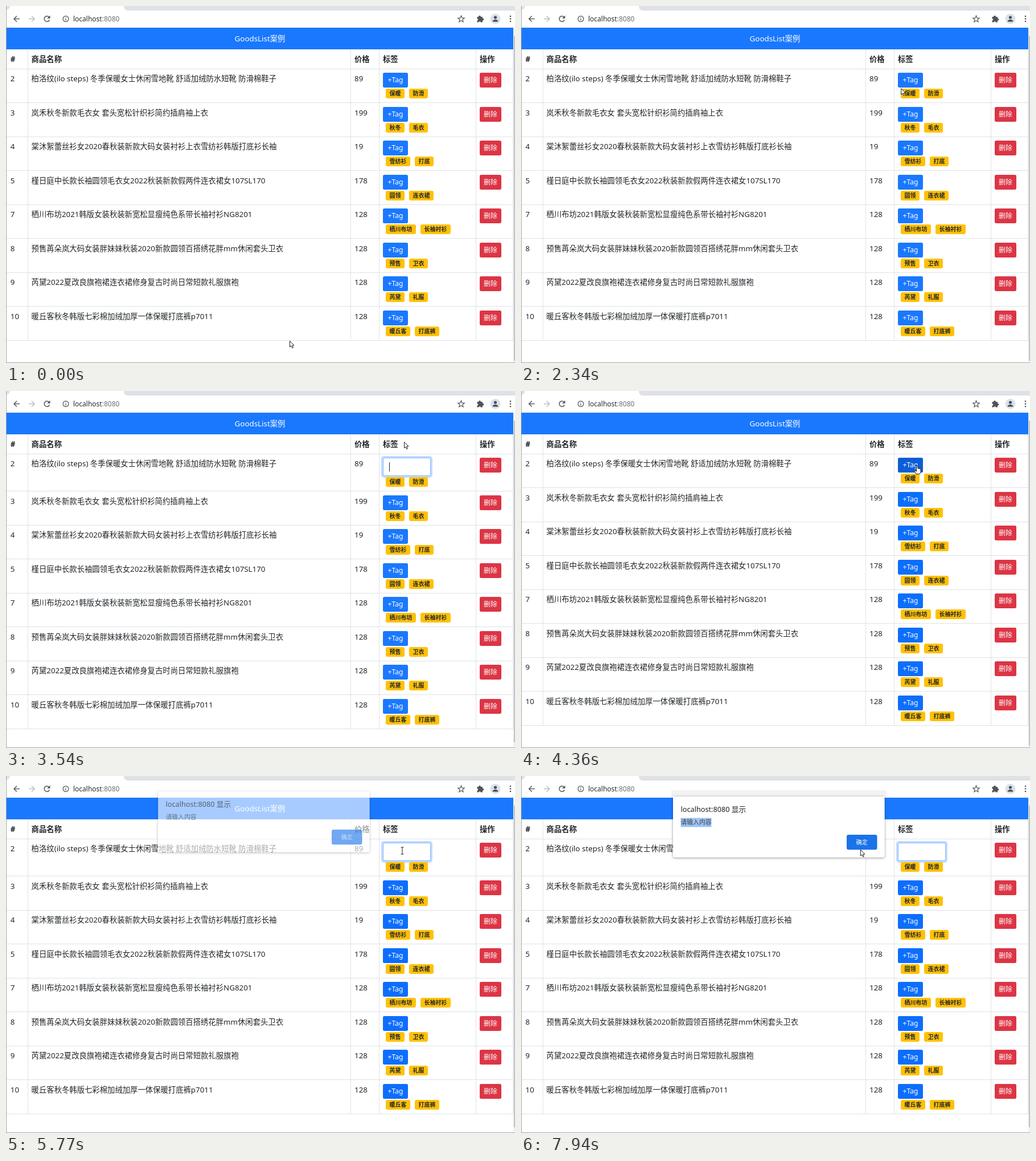
Animation, 894 px wide and 626 px high, one loop 8000 ms. Source, as an HTML page with a canvas:

```html
<!DOCTYPE html>
<html lang="zh-CN">
<head>
<meta charset="utf-8">
<title>GoodsList案例</title>
<style>
html, body { margin: 0; width: 100%; height: 100%; overflow: hidden; background: #fff; }
canvas { display: block; }
</style>
</head>
<body>
<canvas id="stage" width="894" height="626"></canvas>
<script>
const ctx = document.getElementById('stage').getContext('2d');
const LOOP = 8000;
const FONT = '"Noto Sans", "Noto Sans CJK SC", "Noto Sans CJK", sans-serif';
const INK = '#212529', ICON = '#50545a', LINE = '#dee2e6';

const goods = [
  ['2', '柏洛纹(ilo steps) 冬季保暖女士休闲雪地靴 舒适加绒防水短靴 防滑棉鞋子', '89', ['保暖', '防滑']],
  ['3', '岚禾秋冬新款毛衣女 套头宽松针织衫简约插肩袖上衣', '199', ['秋冬', '毛衣']],
  ['4', '棠沐絮蕾丝衫女2020春秋装新款大码女装衬衫上衣雪纺衫韩版打底衫长袖', '19', ['雪纺衫', '打底']],
  ['5', '槿日庭中长款长袖圆领毛衣女2022秋装新款假两件连衣裙女107SL170', '178', ['圆领', '连衣裙']],
  ['7', '栖川布坊2021韩版女装秋装新宽松显瘦纯色系带长袖衬衫NG8201', '128', ['栖川布坊', '长袖衬衫']],
  ['8', '预售苒朵岚大码女装胖妹妹秋装2020新款圆领百搭绣花胖mm休闲套头卫衣', '128', ['预售', '卫衣']],
  ['9', '芮黛2022夏改良旗袍裙连衣裙修身复古时尚日常短款礼服旗袍', '128', ['芮黛', '礼服']],
  ['10', '暖丘客秋冬韩版七彩棉加绒加厚一体保暖打底裤p7011', '128', ['暖丘客', '打底裤']]
];

// Pointer moves: start, end, steps, target x, target y
const moves = [
  [130, 1090, 8, 610, 191],
  [1650, 1651, 1, 608, 189],
  [1810, 2354, 5, 682, 133],
  [2760, 3300, 5, 699, 89],
  [4000, 4360, 4, 696, 131],
  [6260, 6900, 6, 340, 81],
  [7030, 7290, 3, 287, 81],
  [7410, 7411, 1, 280, 81],
  [7530, 7940, 4, 596, 129]
];

const between = (t, a, b) => t >= a && t < b;
const inside = (p, x, y, w, h) => between(p.x, x, x + w) && between(p.y, y, y + h);

function rect(x, y, w, h, color) {
  ctx.fillStyle = color;
  ctx.fillRect(x, y, w, h);
}

function box(x, y, w, h, r, fill, stroke) {
  ctx.beginPath();
  ctx.roundRect(x, y, w, h, r);
  ctx.fillStyle = fill;
  ctx.fill();
  if (!stroke) return;
  ctx.strokeStyle = stroke;
  ctx.lineWidth = 1;
  ctx.stroke();
}

function disc(x, y, r, color) {
  ctx.beginPath();
  ctx.arc(x, y, r, 0, Math.PI * 2);
  ctx.fillStyle = color;
  ctx.fill();
}

function line(points, color, width) {
  ctx.beginPath();
  for (const [x, y] of points) ctx.lineTo(x, y);
  ctx.strokeStyle = color;
  ctx.lineWidth = width;
  ctx.stroke();
}

function text(str, x, y, size = 13.35, color = INK, weight = 400, align = 'left') {
  ctx.font = `${weight} ${size}px ${FONT}`;
  ctx.textAlign = align;
  ctx.fillStyle = color;
  ctx.fillText(str, x, Math.round(y));
}

function pointer(t) {
  let x = 498, y = 587;
  for (const [start, end, steps, tx, ty] of moves) {
    if (t < start) break;
    const step = Math.floor((t - start) / (end - start) * (steps - 1) + 1e-6) + 1;
    const k = Math.min(1, step / steps);
    x += (tx - x) * k;
    y += (ty - y) * k;
  }
  return { x, y };
}

function toolbar() {
  ctx.fillStyle = '#dee1e6';
  ctx.beginPath();
  ctx.moveTo(207, 0);
  ctx.quadraticCurveTo(207, 8, 215, 8);
  ctx.lineTo(894, 8);
  ctx.lineTo(894, 0);
  ctx.fill();
  ctx.beginPath();
  ctx.moveTo(0, 0);
  ctx.lineTo(7, 0);
  ctx.quadraticCurveTo(6, 6, 0, 7);
  ctx.fill();

  for (const [x, dir, color] of [[19, -1, ICON], [45, 1, '#b9bbbe']]) {
    line([[x - dir * 5, 22.5], [x + dir * 5, 22.5]], color, 1.4);
    line([[x, 17.5], [x + dir * 5, 22.5], [x, 27.5]], color, 1.4);
  }
  ctx.beginPath();
  ctx.arc(72, 22.5, 4.8, 0.4, 5.5);
  ctx.strokeStyle = ICON;
  ctx.lineWidth = 1.5;
  ctx.stroke();
  ctx.fillStyle = ICON;
  ctx.beginPath();
  ctx.moveTo(77.5, 16.5);
  ctx.lineTo(77.5, 21.8);
  ctx.lineTo(72.2, 21.8);
  ctx.fill();

  ctx.beginPath();
  ctx.arc(105, 22.5, 4.9, 0, Math.PI * 2);
  ctx.lineWidth = 1.2;
  ctx.stroke();
  rect(104.4, 22, 1.2, 3.3, ICON);
  rect(104.4, 19.6, 1.2, 1.3, ICON);
  text('localhost', 118, 27, 12, '#26282b');
  text(':8080', 118 + ctx.measureText('localhost').width, 27, 12, '#6a6e73');

  ctx.beginPath();
  for (let i = 0; i < 10; i++) {
    const a = i * Math.PI / 5 - Math.PI / 2, r = i % 2 ? 2.6 : 6;
    ctx.lineTo(799.5 + r * Math.cos(a), 23 + r * Math.sin(a));
  }
  ctx.closePath();
  ctx.strokeStyle = ICON;
  ctx.lineWidth = 1.2;
  ctx.stroke();

  rect(827.5, 19, 9.5, 9.5, ICON);
  disc(832, 18.6, 1.9, ICON);
  disc(837.4, 23.6, 1.9, ICON);
  disc(827.6, 23.8, 1.6, '#fff');
  disc(832, 28.6, 1.6, '#fff');

  disc(859.5, 22.5, 9, '#dbe1e9');
  disc(859.5, 20, 2.6, '#454e5c');
  ctx.beginPath();
  ctx.ellipse(859.5, 27.5, 5, 3.7, 0, Math.PI, 0);
  ctx.fill();
  for (const y of [18, 22.5, 27]) disc(886, y, 1.35, ICON);
}

function badges(tags, y) {
  let x = 667;
  for (const tag of tags) {
    const w = tag.length * 10 + 13;
    box(x, y, w, 17, 3.3, '#ffc107');
    text(tag, x + w / 2, y + 12.3, 10, INK, 700, 'center');
    x += w + 8;
  }
}

function button(label, x, y, w, color, size) {
  box(x, y, w, 26, 2.7, color);
  text(label, x + w / 2, y + 17.3, size, '#fff', 400, 'center');
}

function input(focused, caret) {
  if (focused) box(659, 114, 90, 38, 5, '#c2dbfe');
  box(662.5, 117.5, 83, 31, 3, '#fff', focused ? '#86b7fe' : '#ced4da');
  if (caret) rect(673, 125, 1, 16, '#222');
}

function table(t, editing, cursor) {
  const blue = t < 3690 ? '#1a78ff' : '#0d6efd';
  const grow = editing ? 6 : 0;
  const bottom = 586 + grow;
  rect(1, 38, 890, 38, '#1a78ff');
  text('GoodsList案例', 446, 62, 13.35, '#fff', 400, 'center');

  for (const x of [38, 605, 655, 825, 890]) rect(x, 76, 1, bottom - 75, LINE);
  rect(1, 110, 890, 1, LINE);
  const heads = [['#', 7.8], ['商品名称', 44.6], ['价格', 612], ['标签', 662], ['操作', 832]];
  for (const [label, x] of heads) text(label, x, 98.3, 13.35, INK, 700);

  goods.forEach(([id, name, price, tags], i) => {
    const y = 110 + 59.5 * i + (i ? grow : 0);
    const top = Math.round(y + 7.2);
    const edited = editing && i === 0;
    rect(1, Math.floor(110 + 59.5 * (i + 1) + grow), 890, 1, LINE);
    text(id, 7.8, y + 22);
    text(name, 44.6, y + 22);
    text(price, 612, y + 22);
    if (edited) {
      const focused = between(t, 2610, 3690) || t >= 4880;
      const caret = between(t, 2490, 3010) || between(t, 3530, 3690) || between(t, 4730, 5310);
      input(focused, caret);
    } else {
      const hover = inside(cursor, 662, top, 44, 26);
      button('+Tag', 662, top, 44, hover ? '#0b5ed7' : blue, 12.2);
    }
    badges(tags, Math.round(y + 35.2) + (edited ? 6 : 0));
    button('删除', 832, top, 38, '#dc3545', 11.9);
  });
}

function frame(editing) {
  rect(891, 39, 3, 587, '#f1f1f1');
  rect(892, 52, 2, editing ? 564 : 570, '#c1c1c1');
  rect(0, 0, 1, 626, '#a6a6a6');
  rect(0, 625, 894, 1, '#a6a6a6');
}

// The shadow is clipped to the outside so it never shows through the panel.
function panel(x, y, w, h, r) {
  ctx.save();
  ctx.beginPath();
  ctx.rect(0, 0, 894, 626);
  ctx.roundRect(x, y, w, h, r);
  ctx.clip('evenodd');
  ctx.shadowColor = 'rgba(0,0,0,.45)';
  ctx.shadowBlur = 4;
  ctx.shadowOffsetY = 1;
  box(x, y, w, h, r, '#fff');
  ctx.restore();
  box(x, y, w, h, r, '#fff');
}

function dialog(t, cursor) {
  ctx.save();
  if (t < 5890) {
    ctx.globalAlpha = 0.62;
    ctx.translate(0, -9);
  } else {
    rect(264, 25, 378, 11, '#f2f2f3');
  }
  panel(267, 36, 371.5, 106.5, 3);
  text('localhost:8080 显示', 280.5, 63, 12.7, '#202124');
  if (t >= 7030) {
    const from = t >= 7410 ? 0 : Math.min(5, Math.max(0, Math.round((cursor.x - 280.5) / 10.8)));
    rect(280.5 + from * 10.8, 73.5, (5 - from) * 10.8, 16, '#9cc3f5');
  }
  text('请输入内容', 280.5, 85.3, 10.8, '#3c4043');
  box(572, 103, 53.5, 26.3, 3.3, '#1a73e8');
  text('确定', 598.8, 120, 10.2, '#fff', 400, 'center');
  ctx.restore();
}

function shape(points) {
  ctx.beginPath();
  for (const [x, y] of points) ctx.lineTo(x, y);
  ctx.closePath();
  ctx.fillStyle = '#fff';
  ctx.fill();
  ctx.strokeStyle = '#222';
  ctx.lineWidth = 1;
  ctx.stroke();
}

const cursors = {
  arrow() {
    shape([[0.5, 0.5], [0.5, 11], [3, 8.8], [4.7, 12.7], [6.4, 12], [4.8, 8.2], [8, 8]]);
  },
  beam() {
    line([[0, -6], [0, 6]], '#333', 1.1);
    for (const y of [-6, 6]) line([[-2.5, y], [2.5, y]], '#333', 1.1);
  },
  hand() {
    shape([[-1.5, 0], [0.8, 0], [0.8, 4.5], [6, 5.8], [6, 10.5], [4.5, 14.5],
      [-1.8, 14.5], [-5, 9.5], [-4, 8.3], [-1.5, 10]]);
  }
};

function drawCursor(p, editing, modal) {
  let kind = 'arrow';
  if (modal && inside(p, 267, 36, 372, 107)) {
    if (inside(p, 278, 73, 64, 17)) kind = 'beam';
  } else if (editing && inside(p, 662, 117, 84, 32)) {
    kind = 'beam';
  } else if (!editing && inside(p, 662, 117, 44, 26)) {
    kind = 'hand';
  }
  ctx.save();
  ctx.translate(p.x, p.y);
  cursors[kind]();
  ctx.restore();
}

function draw(now) {
  const t = now % LOOP;
  const cursor = pointer(t);
  const editing = between(t, 2490, 3690) || t >= 4730;
  const modal = t >= 5770;
  rect(0, 0, 894, 626, '#fff');
  toolbar();
  table(t, editing, cursor);
  frame(editing);
  if (modal) dialog(t, cursor);
  drawCursor(cursor, editing, modal);
}

const begin = performance.now();
function tick() {
  draw(performance.now() - begin);
  requestAnimationFrame(tick);
}
tick();
</script>
</body>
</html>
```
